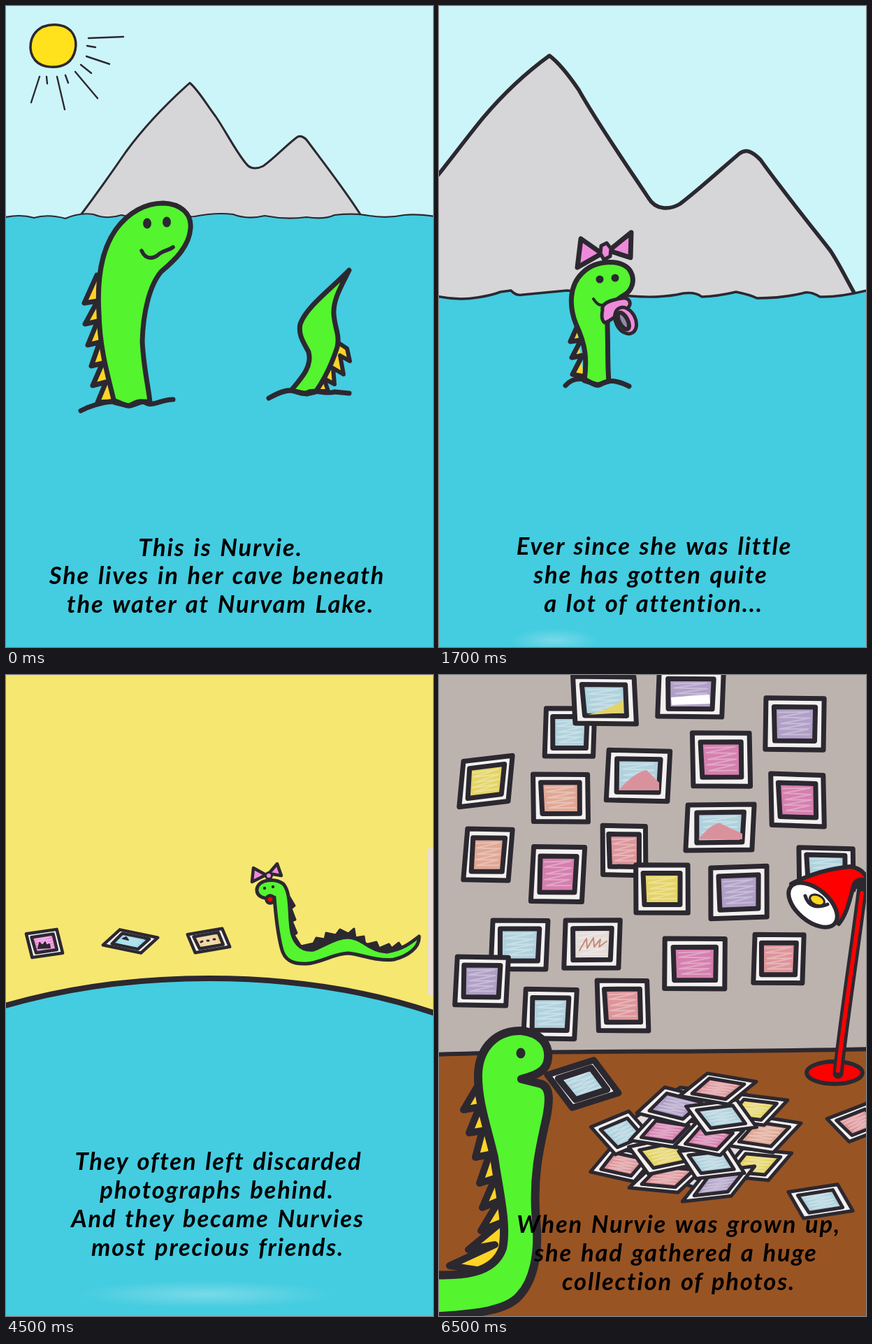
An HTML page without scripts for the animation above (8 s loop, 611x917 px).

```html
<!DOCTYPE html>
<html lang="en">
<head>
<meta charset="utf-8">
<title>Lake story</title>
<style>
html, body { margin: 0; width: 100%; height: 100%; overflow: hidden; background: #44cce0; }
svg { display: block; width: 100%; height: 100%; fill: none; stroke: #2c2830; stroke-linecap: round; stroke-linejoin: round; }
text { font: italic 700 34.5px Lato, "Open Sans", sans-serif; letter-spacing: 1.8px; word-spacing: 2.5px; text-anchor: middle; fill: #000; stroke: none; }

.scene { visibility: hidden; animation: 8s step-end infinite; }
#meet { animation-name: meet; }
#baby { animation-name: baby; }
#fans { animation-name: fans; }
#finds { animation-name: finds; }
#cave { animation-name: cave; }
@keyframes meet { 0% { visibility: visible } 6.25%, 100% { visibility: hidden } }
@keyframes baby { 0% { visibility: hidden } 6.25% { visibility: visible } 31.25%, 100% { visibility: hidden } }
@keyframes fans { 0% { visibility: hidden } 31.25% { visibility: visible } 56.25%, 100% { visibility: hidden } }
@keyframes finds { 0% { visibility: hidden } 56.25% { visibility: visible } 81.25%, 100% { visibility: hidden } }
@keyframes cave { 0% { visibility: hidden } 81.25%, 100% { visibility: visible } }

.flat { stroke: none; }
.sky { fill: #ccf5fa; stroke: none; }
.sand { fill: #f6e771; stroke: none; }
.water { fill: #44cce0; }
.rock { fill: #d6d6d8; }
.green { fill: #54f42f; }
.gold { fill: #ffd427; }
.bow { fill: #ee8adb; }
.ink { fill: #2c2830; }
.skin { fill: #e2ae66; }
.white { fill: #fff; }
.red { fill: #f00; }
.glow { fill: url(#glow); stroke: none; }

#photo * { vector-effect: non-scaling-stroke; }
#photo .paper { fill: #f3f0f0; }
#photo .print { fill: currentColor; }
#photo .wax { stroke: #fff; stroke-width: 2; opacity: .3; }
.blue { color: #b0d2dd; }
.pink { color: #d57fae; }
.rose { color: #dd959a; }
.plum { color: #b09fc6; }
.lemon { color: #e4d466; }
.peach { color: #e0a795; }
</style>
</head>
<body>
<svg viewBox="0 0 611 917" preserveAspectRatio="none">
<defs>
  <radialGradient id="glow"><stop stop-color="#fff" stop-opacity=".28"/><stop offset="1" stop-color="#fff" stop-opacity="0"/></radialGradient>
  <g id="photo">
    <path class="paper" d="M-36-32L37-33L36 32L-37 33Z"/>
    <path class="print" d="M-26-21L26-22L25 21L-25 22Z"/>
    <path class="wax" d="M-20-14L18-16L-19-8L19-8L-17 0L19-1L-19 7L17 6L-16 14L19 13"/>
  </g>
</defs>

<g id="meet" class="scene">
  <rect class="sky" width="611" height="917"/>
  <path class="rock" stroke-width="3" d="M104 303C125 275 150 240 172 208C200 170 235 135 263 110C275 120 285 138 300 158C315 180 330 210 344 226C350 234 360 233 368 229C385 217 400 200 416 188C421 184 428 188 432 194C455 225 490 270 510 303"/>
  <path class="water" stroke-width="2.2" d="M-5 303Q20 297 40 303Q60 297 85 304Q105 295 125 298Q145 306 165 299Q185 305 270 301Q300 295 325 298Q345 306 370 300Q400 306 430 302Q455 306 470 299Q500 296 520 300Q545 304 570 299Q590 297 620 302V925H-5Z"/>
  <path fill="#ffe21c" stroke-width="3.5" d="M52 30C68 24 88 26 96 40C104 54 99 74 87 82C74 90 52 89 42 78C31 65 32 41 52 30Z"/>
  <path stroke-width="2.4" d="M118 46L168 44M116 57l12 2M115 72L148 83M107 84l15 12M99 94L131 132M85 99l4 11M73 101L84 148M58 101l1 10M48 101L36 138"/>
  <g stroke-width="7">
    <path class="gold" d="M130 385L112 425L131 422L113 455L131 451L117 485L134 481L122 515L138 511L124 543L143 538L131 567L152 566"/>
    <path class="green" d="M155 567C146 530 134 490 133 440C130 390 136 350 157 320C175 295 200 282 225 282C250 283 266 297 264 318C262 345 240 365 222 380C205 400 196 440 195 480C197 520 204 545 206 567C192 563 185 572 175 572Z"/>
    <path d="M107 579C120 572 140 567 155 565C165 567 172 574 178 571C188 565 195 564 203 569C212 572 225 562 239 563"/>
    <path stroke-width="5.5" d="M194 350C200 364 212 362 220 354C228 349 234 349 239 345"/>
    <path class="gold" stroke-width="6" d="M473 480L488 490L492 508L478 500L483 527L468 518L470 541L455 533L461 551L444 551"/>
    <path class="green" d="M408 550C425 530 438 515 433 495C425 480 418 470 421 455C430 430 465 405 491 378C480 400 468 420 469 440C470 460 478 470 474 488C467 510 455 535 443 552L430 555Z"/>
    <path d="M376 561C390 553 400 549 410 550C420 553 426 557 434 552C445 549 460 556 470 552L491 554"/>
  </g>
  <g class="ink flat"><ellipse cx="202" cy="311" rx="6" ry="7.5"/><ellipse cx="230" cy="309" rx="6" ry="7.5"/></g>
  <text x="307" y="787">This is Nurvie.</text>
  <text x="302" y="827">She lives in her cave beneath</text>
  <text x="307" y="868">the water at Nurvam Lake.</text>
</g>

<g id="baby" class="scene">
  <rect class="sky" width="611" height="917"/>
  <path class="rock" stroke-width="5.5" d="M-8 250C15 222 40 188 63 160C90 128 125 95 158 71C170 80 185 98 200 120C225 165 270 230 300 275C310 292 330 292 345 283C375 260 405 232 430 211C440 204 448 208 460 220C490 262 535 318 560 350C572 368 580 385 595 412V430H-8Z"/>
  <path class="water" stroke-width="3.5" d="M-8 414Q25 422 55 417Q75 414 88 409L103 407Q110 415 120 413L183 407L275 415Q310 418 340 413Q365 407 376 416Q400 415 425 409Q445 413 455 418Q490 418 520 411Q530 407 545 416Q575 417 620 405V925H-8Z"/>
  <ellipse class="glow" cx="165" cy="908" rx="65" ry="18"/>
  <g stroke-width="7">
    <path class="gold" d="M197 460L188 480L203 478L190 503L205 500L191 527L207 530"/>
    <path class="green" d="M208 536C212 505 210 485 196 455C186 430 186 400 205 382C225 362 262 362 273 378C282 392 276 408 264 414C250 422 240 435 241 460C242 490 241 515 243 537L227 542Z"/>
    <path d="M181 543C190 533 200 532 210 535C220 540 226 545 232 541C240 536 250 533 272 544"/>
    <path class="bow" d="M203 333L198 374L233 354ZM275 324L243 350L274 360Z"/>
    <path class="bow" stroke-width="5" d="M232 343L240 339L246 347L245 358L236 363L231 354Z"/>
    <path stroke-width="4" d="M221 419Q228 431 238 427"/>
    <path class="bow" stroke-width="5" d="M234 435C231 424 250 420 262 418C272 416 277 426 270 432C255 440 245 452 237 453C233 450 232 445 234 435Z"/>
    <g transform="rotate(-28 267 450)"><ellipse class="bow" cx="267" cy="450" rx="14" ry="20" stroke-width="5"/><ellipse cx="264" cy="449" rx="6" ry="13" fill="#918aa6" stroke-width="6"/></g>
  </g>
  <g class="ink flat"><circle cx="230" cy="391" r="5.5"/><circle cx="252" cy="389" r="5.5"/></g>
  <text x="308" y="785">Ever since she was little</text>
  <text x="303" y="826">she has gotten quite</text>
  <text x="307" y="867">a lot of attention...</text>
</g>

<g id="fans" class="scene">
  <rect class="sand" width="611" height="917"/>
  <path class="water" stroke-width="8" d="M-8 328C100 296 200 287 290 287C400 287 510 299 620 337V930H-8Z"/>
  <g stroke-width="4">
    <ellipse class="skin" cx="57" cy="178" rx="6" ry="14"/>
    <path stroke-width="3" d="M51 128l9 10l-3 8l8 8M66 132l5 9l-3 8M55 197q-8-4-5-10"/>
    <path fill="#ff0fd0" d="M66 184L58 246L91 248L89 195L108 190L106 178L92 182Z"/>
    <path class="ink" d="M61 155L98 152L99 180L63 183Z"/>
    <g class="white"><ellipse cx="68" cy="254" rx="6" ry="7"/><ellipse cx="88" cy="252" rx="6" ry="7"/></g>

    <ellipse class="skin" cx="224" cy="118" rx="23" ry="13"/>
    <path stroke-width="5" d="M203 112l1-9M209 108l1-7M217 107l0-8M225 106l3-9M233 108l4-9M240 109l8-6M204 111Q224 102 245 109"/>
    <path class="skin" d="M250 138q12-2 11 8q-4 10-12 5ZM190 150q-10 3-8 9l7 9"/>
    <path fill="#19ecf6" d="M203 154L235 155L230 193L205 191Z"/>
    <path fill="#0d4ff0" d="M205 191L230 193L235 221L243 236Q236 244 227 236L218 224L205 237Q194 243 188 235L203 222Z"/>
    <path class="ink" d="M186 122L247 117L251 152L189 159Z"/>

    <ellipse class="skin" cx="373" cy="112" rx="19" ry="17"/>
    <path stroke-width="8" d="M353 98Q369 87 386 99Q392 107 390 116"/>
    <path class="skin" d="M381 130q13 0 10 10q-5 8-12 6ZM336 132q-9 4-6 12l8 4"/>
    <path fill="#fb0808" d="M337 143L382 138L376 186L345 187L346 163Z"/>
    <path fill="#3e4552" d="M345 187L374 186L376 220L386 236Q379 243 368 237L360 226L348 237Q336 243 327 235L344 221Z"/>
    <path class="ink" d="M337 110L379 109L381 138L336 141Z"/>

    <ellipse class="skin" cx="540" cy="113" rx="16" ry="17"/>
    <path stroke-width="4.5" d="M514 102Q537 91 550 108Q560 125 568 155M540 101Q556 115 559 151M547 125l4 18"/>
    <path fill="#0c42f4" d="M511 146L547 158L553 200L566 241L490 240L508 195Z"/>
    <path class="ink" d="M491 112L536 109L537 143L543 156L528 148L494 144Z"/>
    <g class="white"><ellipse cx="514" cy="250" rx="10" ry="6"/><ellipse cx="543" cy="249" rx="9" ry="6"/><circle cx="486" cy="131" r="7"/><circle cx="489" cy="115" r="4"/></g>
  </g>
  <g class="white flat"><ellipse cx="82" cy="171" rx="8" ry="4"/><ellipse cx="217" cy="139" rx="8" ry="5"/><ellipse cx="351" cy="130" rx="8" ry="4"/><ellipse cx="505" cy="129" rx="4" ry="6"/></g>
  <path stroke-width="4" stroke-linecap="butt" d="M94 136l14-6M117 144l14-2M114 204l6 7M156 128l9 5M178 98l9 8M205 82l5 6M242 83l6-4M268 117l9-3M250 172l9 5M302 114l10 5M274 138l9-2M306 136l12-3M334 78l7 8M410 102l11-5M423 122l7 0M404 149l9 7M455 106l11 2M448 139l7 0M484 79l9 9M483 173l6-6"/>
  <g stroke-width="11.5">
    <path class="green" d="M270 652C285 612 300 570 298 530C297 510 290 500 278 490C258 476 250 460 255 440C262 412 285 399 312 398C350 397 378 425 381 455C383 500 365 530 350 560C338 585 328 615 327 658L302 672Z"/>
    <path d="M226 677C245 666 260 661 272 661C285 663 292 674 302 675C315 671 318 659 335 661C350 663 360 668 368 673"/>
    <path class="bow" d="M267 344L257 401L302 377ZM367 339L317 374L369 398Z"/>
    <path class="ink" stroke-width="6" d="M309 361L320 374L317 389L302 392L296 378Z"/>
    <circle class="bow flat" cx="311" cy="381" r="6"/>
  </g>
  <text x="308" y="841">...from people with cameras!</text>
</g>

<g id="finds" class="scene">
  <rect class="sand" width="611" height="917"/>
  <rect class="flat" x="604" y="248" width="7" height="210" fill="#eaded9"/>
  <path class="water" stroke-width="8" d="M-8 475C100 443 200 434 290 434C400 434 510 448 620 486V930H-8Z"/>
  <ellipse class="glow" cx="285" cy="886" rx="185" ry="20"/>
  <g stroke-width="4.5">
    <use href="#photo" color="#ea86d8" transform="matrix(.6 -.08 .14 .52 55 384)"/>
    <use href="#photo" color="#8ed6e4" transform="matrix(.74 .16 -.36 .34 178 381)"/>
    <use href="#photo" color="#eecb8a" transform="matrix(.68 -.11 .18 .4 290 380)"/>
    <path class="ink" stroke-width="2" d="M46 391l2-8l4 4l4-5l2 5l4-2l1 5ZM167 377l8 2l-3-4Z"/>
    <path stroke-width="3" d="M279 382l2-1M288 380l2 0M297 378l2 0"/>
    <path class="ink" stroke-width="3" d="M406 318L413 330L408 334L414 350L409 352L416 369L412 372L422 388L440 384L444 376L456 378L458 369L472 372L478 364L490 370L498 363L500 376L512 374L514 386L530 382L534 391L548 385L552 391L562 383L566 389L545 400L490 382L430 397L404 370Z"/>
    <path class="green" stroke-width="5" d="M384 318C372 322 358 318 359 306C362 292 385 290 397 299C408 312 405 340 408 362C410 380 420 395 440 393C465 382 475 375 490 375C510 376 520 395 545 396C570 392 580 382 591 374C592 390 575 402 555 407C530 410 510 400 490 398C470 398 450 412 430 413C410 414 398 408 394 390C389 370 386 345 384 318Z"/>
    <circle class="red" cx="378" cy="321" r="5.5"/>
    <path class="bow" d="M354 276L352 296L372 286ZM388 270L376 284L394 287Z"/>
    <circle class="bow" cx="376" cy="287" r="4.5" stroke-width="3"/>
  </g>
  <g class="ink flat"><circle cx="370" cy="305" r="2.2"/><circle cx="382" cy="303" r="2.2"/></g>
  <text x="304" y="708">They often left discarded</text>
  <text x="302" y="749">photographs behind.</text>
  <text x="303" y="790">And they became Nurvies</text>
  <text x="303" y="831">most precious friends.</text>
</g>

<g id="cave" class="scene">
  <rect class="flat" width="611" height="917" fill="#bdb3ae"/>
  <path fill="#995423" stroke-width="6" d="M-8 543C200 536 350 541 620 535V930H-8Z"/>
  <g stroke-width="7">
    <use href="#photo" class="blue" transform="matrix(.95 .02 -.02 1.05 187 82)"/>
    <use href="#photo" class="blue" transform="matrix(1.2 .03 .07 1.03 237 36)"/>
    <use href="#photo" class="plum" transform="matrix(1.26 .03 -.02 1 360 27)"/>
    <use href="#photo" class="plum" transform="matrix(1.14 .03 0 1.13 509 70)"/>
    <use href="#photo" class="pink" transform="matrix(1.12 .02 .04 1.17 404 121)"/>
    <use href="#photo" class="lemon" transform="matrix(.96 -.1 -.08 1 67 152)"/>
    <use href="#photo" class="peach" transform="matrix(1.07 .02 .03 1.04 174 176)"/>
    <use href="#photo" class="blue" transform="matrix(1.2 .04 -.04 1.1 285 144)"/>
    <use href="#photo" class="pink" transform="matrix(1.03 .05 .04 1.13 513 179)"/>
    <use href="#photo" class="blue" transform="matrix(1.3 0 -.03 1 402 218)"/>
    <use href="#photo" class="peach" transform="matrix(.88 .03 -.08 1.12 70 257)"/>
    <use href="#photo" class="rose" transform="matrix(.84 .03 .02 1.08 265 251)"/>
    <use href="#photo" class="pink" transform="matrix(1 .03 -.05 1.2 170 285)"/>
    <use href="#photo" class="lemon" transform="matrix(1.02 .02 .02 1.05 319 306)"/>
    <use href="#photo" class="plum" transform="matrix(1.1 -.02 .02 1.12 429 311)"/>
    <use href="#photo" class="blue" transform="matrix(1.06 .04 .03 .9 554 277)"/>
    <use href="#photo" class="blue" transform="matrix(1.08 .02 -.03 1.07 115 386)"/>
    <use href="#photo" color="#e4dcd9" transform="matrix(1.07 .01 -.02 1.05 219 385)"/>
    <use href="#photo" class="plum" transform="matrix(1 .03 -.04 1.06 61 438)"/>
    <use href="#photo" class="pink" transform="matrix(1.18 .02 .01 1.1 366 413)"/>
    <use href="#photo" class="rose" transform="matrix(.96 .02 -.02 1.06 486 406)"/>
    <use href="#photo" class="blue" transform="matrix(1 .03 -.04 1.08 159 485)"/>
    <use href="#photo" class="rose" transform="matrix(.98 .02 .05 1.1 263 473)"/>
  </g>
  <g class="flat">
    <path fill="#e4d466" d="M213 57Q240 50 264 36V54Z"/>
    <path class="white" d="M332 32L387 28L388 41L333 43Z"/>
    <path fill="#d9929c" d="M257 165Q278 140 297 136L315 154V165Z"/>
    <path fill="#d9929c" d="M371 235Q390 212 402 212L434 227V235Z"/>
  </g>
  <path stroke="#c58b77" stroke-width="2" d="M201 394l10-17l1 14l9-15l1 13l9-11l-2 11l11-8"/>

  <g stroke-width="6">
    <ellipse class="red" cx="566" cy="569" rx="40" ry="16"/>
    <path stroke-width="15" d="M571 570C578 500 594 400 605 312C608 297 601 294 595 299"/>
    <path stroke="#f00" stroke-width="6" d="M571 566C578 500 594 400 605 312"/>
    <path class="red" d="M504 299C530 285 560 277 588 274C603 276 611 284 614 296C606 291 598 292 594 299C588 320 584 342 572 356Z"/>
    <ellipse class="white" cx="535" cy="329" rx="41" ry="23" transform="rotate(40 535 329)"/>
    <path d="M524 316Q531 338 556 328" stroke-width="5"/>
    <ellipse cx="541" cy="322" rx="11" ry="7" fill="#fbd71b" stroke-width="3" transform="rotate(25 541 322)"/>
  </g>

  <path fill="#e4dede" stroke-width="5" d="M345 590L440 600L490 650L440 720L380 738L255 695L270 640Z"/>
  <g stroke-width="5">
    <use href="#photo" class="rose" transform="matrix(.85 .2 -.45 .55 263 700)"/>
    <use href="#photo" class="lemon" transform="matrix(.95 .1 -.5 .6 453 700)"/>
    <use href="#photo" class="rose" transform="matrix(.95 .1 -.6 .58 327 718)"/>
    <use href="#photo" class="plum" transform="matrix(.95 -.1 -.5 .65 400 728)"/>
    <use href="#photo" class="blue" transform="matrix(.75 -.3 .55 .6 262 655)"/>
    <use href="#photo" class="peach" transform="matrix(.9 .15 -.6 .65 465 657)"/>
    <use href="#photo" class="lemon" transform="matrix(1 -.2 .45 .6 322 687)"/>
    <use href="#photo" class="blue" transform="matrix(.95 -.1 .4 .6 390 697)"/>
    <use href="#photo" class="pink" transform="matrix(.9 .15 -.5 .55 323 653)"/>
    <use href="#photo" class="pink" transform="matrix(.9 .18 -.5 .55 386 663)"/>
    <use href="#photo" class="lemon" transform="matrix(.9 .12 -.5 .55 449 622)"/>
    <use href="#photo" class="plum" transform="matrix(.95 .25 -.6 .57 338 617)"/>
    <use href="#photo" class="blue" transform="matrix(1 -.12 .45 .6 404 632)"/>
    <use href="#photo" class="rose" transform="matrix(.95 .17 -.6 .5 399 592)"/>
    <use href="#photo" class="rose" transform="matrix(.8 -.3 .5 .5 600 640)"/>
    <use href="#photo" class="blue" transform="matrix(.97 -.14 .35 .58 546 753)"/>
  </g>
  <use href="#photo" class="blue" stroke-width="9" transform="matrix(.92 -.28 .56 .72 206 585)"/>

  <path class="gold" stroke-width="10" d="M54 590L35 622L58 618L43 655L62 652L52 690L72 686L58 727L80 720L62 762L86 752L60 795L88 784L42 822L80 815L15 845L60 852L110 840L100 700L75 590Z"/>
  <path class="green" stroke-width="12" d="M-12 858C30 860 78 858 91 820C98 785 86 740 79 690C70 650 55 610 56 570C58 530 85 508 118 509C145 512 158 528 156 548C155 562 147 571 118 578L146 585C160 590 158 610 154 632C143 680 134 720 139 780C144 830 134 868 115 888C98 908 60 914 -12 918Z"/>
  <ellipse class="ink flat" cx="117" cy="541" rx="6.5" ry="7.5"/>
  <text x="343" y="798">When Nurvie was grown up,</text>
  <text x="339" y="839">she had gathered a huge</text>
  <text x="343" y="880">collection of photos.</text>
</g>
</svg>
</body>
</html>
```
